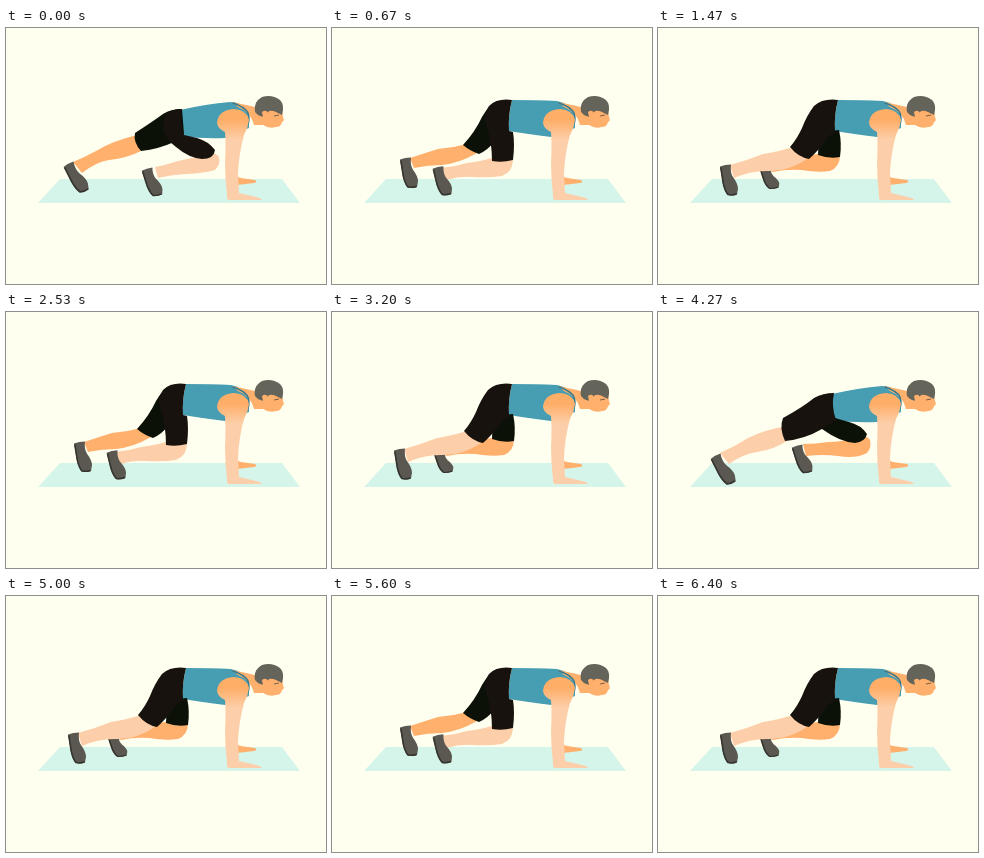
Recreate the animation shown at these times as an HTML page. Size 320 px wide and 256 px high, loop 6470 ms.

```html
<!DOCTYPE html>
<html lang="en">
<head>
<meta charset="utf-8">
<title>Mountain climber exercise</title>
<style>
  html, body { margin: 0; width: 100%; height: 100%; overflow: hidden; background: #fffff0; }
  svg { display: block; width: 100vw; height: 100vh; }
  .pose { visibility: hidden; }
  .pose.on { visibility: visible; }
  .mat { fill: #d6f5ea; }
  .shirt { fill: #479db2; }
  .near { fill: #fccfaa; }
  .far { fill: #ffb06c; }
  .shorts { fill: #17120d; }
  .shorts-far { fill: #0b1107; }
  .hair { fill: #64645a; }
  .trim { fill: none; stroke: #35788c; stroke-width: 1.4; stroke-linecap: round; }
</style>
</head>
<body>
<svg viewBox="0 0 320 256">
  <defs>
    <linearGradient id="arm" gradientUnits="userSpaceOnUse" x1="0" y1="92" x2="0" y2="112">
      <stop offset="0" stop-color="#ffae68"/>
      <stop offset="1" stop-color="#fccfaa"/>
    </linearGradient>
    <g id="shoe">
      <path fill="#5a5850" d="M0 2Q5 0 11 0Q10 8 13 13Q18 20 18 25L17 31Q12 33 7 31Q3 25 2 14Z"/>
      <path fill="none" stroke="#35342e" stroke-width="1.6" d="M.8 3L2.6 15Q4 26 8 31Q12 32 16.5 30.5"/>
    </g>
    <path id="shirt-low" class="shirt" d="M174 82Q200 76 224 74L232 75Q236 79 243 82L243 100L219 110Q195 111 177 108Q173 95 174 82Z"/>
    <path id="shirt-high" class="shirt" d="M180 72Q205 72 225 73L232 75Q236 79 243 82L243 100L219 109Q195 106 177 103Q176 88 180 72Z"/>
  </defs>

  <path class="mat" d="M54 151H276L294 175H32Z"/>
  <path class="far" d="M229 148L235 150L249 152Q252 154 248 155L231 157Z"/>

  <!-- near knee driven forward -->
  <g class="pose">
    <use href="#shirt-low"/>
    <path class="far" d="M131 107Q106 113 90 123Q79 129 67 134L76 145Q90 134 103 132Q122 130 137 122Z"/>
    <use href="#shoe" transform="translate(57 137) rotate(-18)"/>
    <path class="shorts-far" d="M176 81Q165 81 157 86Q146 94 129 105Q127 114 135 123Q153 121 168 114L178 106Z"/>
    <path class="near" d="M204 126Q186 130 172 133Q160 137 149 139L152 150Q164 147 180 146Q199 145 209 142Q215 136 213 129Q210 124 204 126Z"/>
    <use href="#shoe" transform="translate(135.5 141) rotate(-8) scale(1 .9)"/>
    <path class="shorts" d="M176 81Q166 81 159 86L157 102Q160 112 170 119Q183 130 196 131Q208 131 209 122Q202 113 191 110L178 107Q173 94 176 81Z"/>
  </g>

  <!-- near leg returning -->
  <g class="pose">
    <use href="#shirt-high"/>
    <path class="far" d="M135 116Q120 120 106 121Q93 125 78 130L82 140Q96 137 110 137Q128 135 145 125Z"/>
    <use href="#shoe" transform="translate(68 129.5) scale(1 .95)"/>
    <path class="shorts-far" d="M166 73Q156 78 150 89Q143 104 131 117Q138 123 147 126Q156 122 163 113Z"/>
    <path class="near" d="M160 130Q146 134 135 135Q122 139 109 140L115 152Q127 148 140 149Q157 150 170 148Q181 144 181 131Z"/>
    <use href="#shoe" transform="translate(100.5 139) rotate(-4) scale(1 .91)"/>
    <path class="shorts" d="M180 72Q165 70 157 78Q150 87 155 99Q160 115 160 133Q170 135 181 132Q183 116 181 104L177 103Q176 87 180 72Z"/>
  </g>

  <!-- far knee driven forward -->
  <g class="pose">
    <use href="#shirt-low"/>
    <path class="far" d="M204 125Q184 130 170 130Q158 132 145 132L148 144Q165 142 180 144Q198 147 209 141Q214 135 212 128Q209 123 204 125Z"/>
    <use href="#shoe" transform="translate(133.5 134) rotate(-8) scale(1 .9)"/>
    <path class="shorts-far" d="M163 100L164 117Q182 130 197 131Q207 130 209 122Q203 113 191 110L177 106Z"/>
    <path class="near" d="M128 114Q106 118 90 126Q76 135 62 141L71 152Q85 142 99 140Q116 138 132 127Z"/>
    <use href="#shoe" transform="translate(52 145) rotate(-18)"/>
    <path class="shorts" d="M176 81Q165 81 156 86Q145 95 125 106Q121 116 127 129Q147 127 164 117L178 108Q173 94 176 81Z"/>
  </g>

  <!-- far leg returning -->
  <g class="pose">
    <use href="#shirt-high"/>
    <path class="far" d="M160 126Q145 128 134 130Q122 134 111 141L115 144Q128 141 143 142Q160 145 172 143Q182 139 182 127Z"/>
    <use href="#shoe" transform="translate(102 141) rotate(-5) scale(1 .65)"/>
    <path class="shorts-far" d="M161 104L160 127Q171 131 182 129Q184 115 181 102Z"/>
    <path class="near" d="M135 119Q119 124 105 126Q90 132 72 137L76 150Q92 143 108 143Q130 144 149 131Z"/>
    <use href="#shoe" transform="translate(62 136.5) scale(1 .97)"/>
    <path class="shorts" d="M180 72Q165 70 156 78Q149 87 144 100Q139 111 132 119Q140 129 151 131Q161 122 167 113Q172 105 180 104L177 103Q176 87 180 72Z"/>
  </g>

  <path class="far" d="M226 74Q236 76 249 79L262 82L276 82L277 89Q279 93 276 94Q275 99 270 99Q263 101 257 97L248 97Q245 84 232 79Z"/>
  <path class="hair" d="M249 84Q247 74 256 69Q266 66 274 72Q279 77 276 87L272 85Q265 81 262 84L260 88Q257 90 252 87Z"/>
  <path class="far" d="M256 84Q260 81 262 85Q261 90 257 89Z"/>
  <path d="M268 88L273 87" stroke="#796046"/>
  <path class="trim" d="M227 75Q239 79 242 85Q244 91 242 96"/>
  <path fill="url(#arm)" d="M211 95Q212 82 228 81Q241 82 243 92Q242 100 238 107Q233 125 232 145L233 165L250 169Q258 171 255 172H225Q220 173 221 167Q219 150 219 135Q220 117 219 104Q212 101 211 95Z"/>
</svg>
<script>
  const LOOP = 6470;
  const FRAME = LOOP / 97;
  const HOLD = 6.375; // frames each pose stays
  const poses = document.querySelectorAll(".pose");

  function draw() {
    const time = performance.now() % LOOP;
    const frame = Math.floor((time + 6) / FRAME) % 97;
    const current = Math.floor(frame / HOLD) % poses.length;
    poses.forEach((pose, i) => pose.classList.toggle("on", i === current));
    requestAnimationFrame(draw);
  }
  draw();
</script>
</body>
</html>
```
